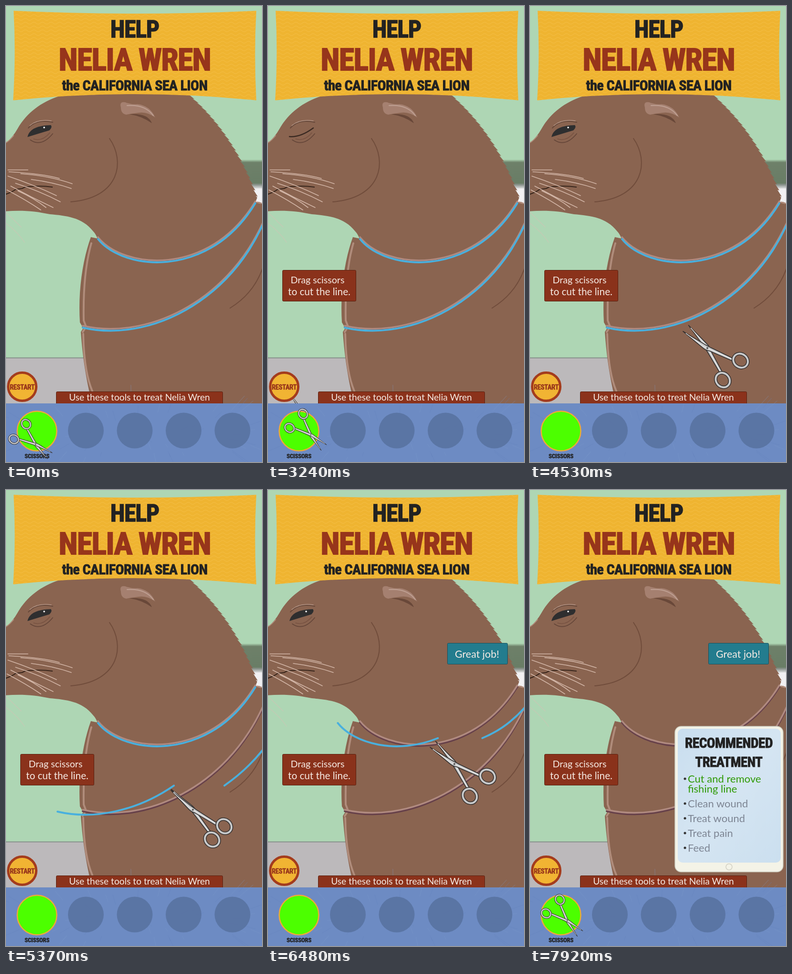
Write an HTML page that moves like this. It is 537x957 px and loops after 8 s.

```html
<!DOCTYPE html>
<html lang="en">
<head>
<meta charset="utf-8">
<title>Sea lion care game</title>
<style>
html, body { margin: 0; width: 100%; height: 100%; overflow: hidden; background: #aed6b4; }
svg { display: block; width: 100%; height: 100%; }
text { text-anchor: middle; font-family: Lato, "Open Sans", sans-serif; fill: #f6ebe4; }
.show { font-family: "Roboto Condensed", "Open Sans Condensed", Roboto, "Open Sans", sans-serif;
  font-weight: 900; font-stretch: condensed; letter-spacing: -.02em; fill: #222; stroke: #222; stroke-linejoin: miter; }
.red { fill: #97351b; stroke: #97351b; }
.list text { text-anchor: start; font-size: 22px; fill: #7d8593; }
.line { fill: none; stroke: #49b0de; stroke-width: 4; stroke-linecap: round; }
.thin { fill: none; stroke-linecap: round; }
</style>
</head>
<body>
<svg viewBox="0 0 537 957" preserveAspectRatio="none">
<defs>
  <linearGradient id="wall" x2="0" y2="1">
    <stop offset="0" stop-color="#aed6b4"/><stop offset=".1" stop-color="#6e8069"/>
    <stop offset=".8" stop-color="#697d66"/><stop offset=".86" stop-color="#8b938d"/><stop offset="1" stop-color="#e9e9ea"/>
  </linearGradient>
  <linearGradient id="screen" x2="1" y2="1">
    <stop offset="0" stop-color="#c9deef"/><stop offset=".5" stop-color="#d5e5f2"/><stop offset="1" stop-color="#cbdfef"/>
  </linearGradient>
  <pattern id="waves" width="18" height="8" patternUnits="userSpaceOnUse">
    <path d="M0 4Q4.500 0 9 4T18 4" fill="none" stroke="#f8cb5c" stroke-width="1" opacity=".45"/>
  </pattern>
  <path id="cutLow" d="M161 675C290 705 460 630 538 460"/>
  <path id="cutTop" d="M193 489C245 555 425 575 523 414"/>
  <g id="half">
    <path d="M-62-1L-9-5Q0-6 8-2L60 9L58 14L6 5L-10 3Z" fill="#c6c7c8" stroke="#34302f" stroke-width="1.600" stroke-linejoin="round"/>
    <path d="M-55-1L-8-2L54 11" fill="none" stroke="#eee" stroke-width="1.300"/>
    <ellipse cx="72" cy="19" rx="16" ry="14" fill="none" stroke="#34302f" stroke-width="7"/>
    <ellipse cx="72" cy="19" rx="16" ry="14" fill="none" stroke="#c9cacb" stroke-width="4"/>
  </g>
</defs>

<rect width="537" height="957" fill="#aed6b4"/>
<rect x="440" y="322" width="97" height="62" fill="url(#wall)"/>
<rect x="440" y="383" width="97" height="60" fill="#f1f0f2"/>
<rect y="739" width="200" height="100" fill="#bcb9bb"/>
<path d="M0 738.500H170" stroke="#87918b" stroke-width="2"/>

<path id="seal" fill="#8a6450"/>
<g class="thin" stroke="#b08c7b">
  <path d="M0 287Q8 282 16 272" stroke-width="2"/>
  <path d="M179 498C164 550 162 610 163 660L168 673L161 684" stroke-width="4"/>
  <path d="M162 688C163 740 169 780 181 808" stroke-width="4"/>
  <path d="M527 412L535 414" stroke-width="3"/>
</g>
<g class="thin" stroke="#704c3b" stroke-width="2">
  <path d="M217 278C250 325 240 402 136 411"/>
  <path d="M470 634Q522 602 540 545"/>
</g>
<path d="M258 227Q298 224 306 246Q285 231 258 227Z" fill="#694839"/>
<path d="M241 213Q237 200 250 202Q262 207 276 206Q302 209 313 234Q296 221 278 224Q262 226 252 228Q241 226 241 213Z" fill="#a58070"/>
<path class="thin" d="M254 209Q292 206 309 230" stroke="#bfa093" stroke-width="2"/>

<path class="thin" d="M47 256Q64 237 98 244" stroke="#66483a" stroke-width="2"/>
<path class="thin" d="M50 251Q66 237 95 241" stroke="#b39384" stroke-width="1.500"/>
<path class="thin" d="M51 281Q74 297 98 268" stroke="#644538" stroke-width="1.700"/>
<path class="thin" d="M58 279Q76 285 92 266" stroke="#765141" stroke-width="1.500"/>
<g id="open">
  <path d="M45 275Q50 251 94 250Q98 254 91 261Q74 266 45 275Z" fill="#2e2e2f"/>
  <circle cx="80" cy="255" r="1.800" fill="#fff"/>
</g>
<path id="shut" class="thin" d="M45 274Q68 276 95 256" stroke="#3b2a22" stroke-width="2.500"/>

<path class="thin" d="M0 395Q14 390 20 385L34 383L40 380Q70 376 97 380" stroke="#38261c" stroke-width="2.200"/>
<path class="thin" stroke="#d2b5a6" stroke-width="1.600" d="M4 344H46M6 348Q78 352 112 362M31 352Q90 356 139 373M53 364Q100 370 137 383M4 357Q60 376 106 398M20 372Q70 388 114 411M10 378Q54 402 99 423M25 388Q60 404 84 423M2 386Q42 407 73 428"/>
<path class="thin" stroke="#c5c9b5" stroke-width="1.300" d="M0 433L32 464M0 456Q24 474 39 496"/>

<g class="thin">
  <use href="#cutTop" y="-1" stroke="#67414a" stroke-width="4"/><use href="#cutTop" y="-4" stroke="#b08a80" stroke-width="3.500"/>
  <use href="#cutLow" y="-1" stroke="#67414a" stroke-width="4"/><use href="#cutLow" y="-4" stroke="#b08a80" stroke-width="3.500"/>
</g>
<g id="lines"></g>
<g id="big"><use class="a" href="#half"/><use class="b" href="#half"/><circle r="2" fill="#555"/></g>

<path d="M16 10Q270 22 525 10Q520 100 525 198Q270 172 15 198Q21 100 16 10Z" fill="#efb431"/>
<path d="M16 10Q270 22 525 10Q520 100 525 198Q270 172 15 198Q21 100 16 10Z" fill="url(#waves)"/>
<g id="title"></g>

<g id="hint"><rect x="30.500" y="554.500" width="154" height="65" rx="2" fill="#8a321b" stroke="#59200f"/></g>
<g id="praise"><rect x="374.500" y="321.500" width="126" height="44" rx="2" fill="#237c8e" stroke="#17505c"/></g>

<circle cx="34" cy="799" r="29.500" fill="#f1b433" stroke="#a43c1d" stroke-width="5"/>
<g id="restart"></g>

<rect y="834" width="537" height="123" fill="#6d8bc3"/>
<g id="tray"></g>
<circle cx="65" cy="892" r="41.500" fill="#4cff00" stroke="#f2a73a" stroke-width="2.500"/>
<g id="label"></g>
<g id="small"><use class="a" href="#half"/><use class="b" href="#half"/><circle r="2" fill="#555"/></g>
<g id="bar"><path d="M105.500 834V811.500Q105.500 809.500 107.500 809.500H452.500Q454.500 809.500 454.500 811.500V834" fill="#8b321b" stroke="#59200f"/></g>

<g id="tablet">
  <rect x="304" y="496" width="227" height="305.500" rx="13" fill="#f4f3e7" stroke="#c9c8ba" stroke-width="1.500"/>
  <rect x="310" y="501" width="216" height="281" rx="10" fill="url(#screen)"/>
  <circle cx="417.500" cy="791" r="6.500" fill="none" stroke="#d3d1c4" stroke-width="1.500"/>
  <g class="list">
    <g id="done"><text x="331" y="614">Cut and remove</text><text x="331" y="635">fishing line</text></g>
    <text x="331" y="666">Clean wound</text><text x="331" y="697">Treat wound</text>
    <text x="331" y="728">Treat pain</text><text x="331" y="759">Feed</text>
  </g>
  <path d="M325 606h.1M325 658h.1M325 689h.1M325 720h.1M325 751h.1" class="thin" stroke="#333" stroke-width="5"/>
</g>
</svg>

<script>
const $ = id => document.getElementById(id);
const hero = ["Nelia", "Wren"].join(" ");

function add(parent, tag, attrs) {
  const el = document.createElementNS("http://www.w3.org/2000/svg", tag);
  for (const k in attrs) el.setAttribute(k, attrs[k]);
  return parent.appendChild(el);
}

// Text centred on (x, mid), as large as the width and size limits allow
function label(id, str, x, mid, width, max, cls = "") {
  const el = add($(id), "text", { x, class: cls });
  el.textContent = str;
  el.style.fontSize = "100px";
  const size = Math.min(max, 100 * width / el.getComputedTextLength());
  el.style.fontSize = size + "px";
  el.style.strokeWidth = cls ? size * .03 : 0;
  el.setAttribute("y", mid + size * .36);
}
label("title", "HELP", 270, 48.5, 102, 70, "show");
label("title", hero.toUpperCase(), 270, 112, 319, 88, "show red");
label("title", "the CALIFORNIA SEA LION", 270, 166, 305, 40, "show");
label("restart", "RESTART", 34, 800, 52, 20, "show red");
label("label", "SCISSORS", 65, 944, 52, 17, "show");
label("hint", "Drag scissors", 104, 575, 113, 23);
label("hint", "to cut the line.", 107.5, 600, 131, 23);
label("praise", "Great job!", 436.5, 344, 93, 23);
label("bar", "Use these tools to treat " + hero, 280, 821, 296, 22);
label("tablet", "RECOMMENDED", 417, 530, 184, 39, "show");
label("tablet", "TREATMENT", 417, 571, 141, 39, "show");

// Seal outline with tufts of fur down the back of the neck
let fur = "";
for (let i = 1; i <= 20; i++) {
  const u = i / 20, v = 1 - u;
  const x = 385 * v * v + 960 * u * v + 527 * u * u, y = 187 * v * v + 540 * u * v + 400 * u * u;
  fur += `L${x + 1} ${y}L${x - 3} ${y - 1}`;
}
$("seal").setAttribute("d", `M-2 289Q14 276 24 258C42 226 72 202 112 189L250 150L385 187${fur}
  L527 402L523 412L531 411L540 417V840H182C172 800 162 755 157 684L162 676L155 664C151 600 160 535 178 485L192 488
  Q188 478 183 473C160 443 125 440 92 437C60 430 30 428-2 431Z`);

// Tray texture and empty slots
let seed = 7;
const rnd = () => (seed = seed * 16807 % 2147483647) / 2147483647;
for (let i = 0; i < 60; i++) {
  const x = rnd() * 537, y = 838 + rnd() * 110, l = 10 + rnd() * 35;
  add($("tray"), "path", { d: `M${x} ${y}l${(x - 268) / 268 * l} ${(y - 900) / 60 * l}`,
    stroke: i % 2 ? "#7d9bcb" : "#6280bb", opacity: .4 });
}
for (let i = 0; i < 4; i++)
  add($("tray"), "circle", { cx: 167.5 + 102.5 * i, cy: 891, r: 37.5, fill: "#57719f", opacity: .85 });

// Each fishing line is two strokes that part at the cut
const strands = [["#cutTop", 58, 6330], ["#cutLow", 55, 5210]].map(([ref, p, at]) => {
  const d = document.querySelector(ref).getAttribute("d");
  const piece = (dash, off) => add($("lines"), "path",
    { d, class: "line", pathLength: 100, "stroke-dasharray": dash, "stroke-dashoffset": off });
  return { at, left: piece(`${p} 200`, 0), right: piece(`${100 - p} 200`, -p) };
});

// Rows of [time, values...], linear in between
function keys(rows, t) {
  const i = rows.findIndex(r => r[0] > t);
  if (i < 0) return rows[rows.length - 1].slice(1);
  if (!i) return rows[0].slice(1);
  const a = rows[i - 1], b = rows[i], u = (t - a[0]) / (b[0] - a[0]);
  return a.slice(1).map((v, k) => v + (b[k + 1] - v) * u);
}
const part = (t, from, to) => Math.max(0, Math.min(1, (t - from) / (to - from)));
const back = u => 1 + 3.5 * (u - 1) ** 3 + 2.5 * (u - 1) ** 2;
const move = (id, x) => $(id).setAttribute("transform", `translate(${x})`);
const show = (el, on) => el.setAttribute("opacity", +on);

// x, y and opening angle of the cutting scissors
const bigPath = [[3090, 60, 900, 14], [3780, 164, 766, 14], [4530, 372, 718, 7], [4680, 378, 708, 10],
  [4950, 386, 688, 13], [5210, 392, 671, 0], [5500, 392, 671, 0], [5850, 392, 625, 12], [6180, 391, 580, 12],
  [6330, 391, 575, 1], [6480, 391, 575, 7], [6630, 391, 575, 7], [7110, 60, 900, 7]];
// x, y, rotation and opacity of the tray scissors
const smallPath = [[0, 62, 920, 219, 1], [120, 73, 909, 223, 1], [330, 78, 904, 225, 1], [3090, 78, 904, 225, 1],
  [3400, 102, 896, 223, 1], [3600, 151, 879, 221, 1], [3780, 219, 856, 218, 1], [3870, 264, 841, 218, 1],
  [3990, 320, 825, 218, 0], [6840, 264, 841, 218, 0], [6930, 225, 854, 220, 1], [7110, 108, 886, 224, 1],
  [7139, 108, 886, 224, 1], [7140, 78, 904, 225, 1]];
const blinks = [[1200, 1440], [1770, 1980], [3150, 3390], [4890, 5100]];

function scissors(id, x, y, turn, scale, gap) {
  const g = $(id);
  g.setAttribute("transform", `translate(${x} ${y}) rotate(${turn}) scale(${scale})`);
  g.querySelector(".a").setAttribute("transform", `rotate(${gap})`);
  g.querySelector(".b").setAttribute("transform", `scale(1 -1) rotate(${gap})`);
}

function draw(t) {
  const shut = blinks.some(([a, b]) => t >= a && t < b);
  show($("open"), !shut);
  show($("shut"), shut);

  move("hint", -190 * (1 - back(part(t, 0, 360))));
  move("praise", 165 * (1 - part(t, 6180, 6570)) ** 3);
  move("tablet", 240 * (1 - back(part(t, 7260, 7480))));
  for (const el of $("done").children) el.style.fill = t >= 7920 ? "#2f9a06" : "";

  for (const s of strands) {
    const dt = Math.max(0, t - s.at), dx = 46 * (dt / 150) ** 2;
    s.left.setAttribute("transform", `translate(${-dx})`);
    s.right.setAttribute("transform", `translate(${dx})`);
    for (const el of [s.left, s.right]) el.setAttribute("opacity", 1 - part(dt, 200, 280));
  }

  const [bx, by, gap] = keys(bigPath, t);
  scissors("big", bx, by, 42.5, 1, gap);
  show($("big"), t >= 3090 && t < 7110);
  const [sx, sy, turn, alpha] = keys(smallPath, t);
  scissors("small", sx, sy, turn, .63, 11);
  $("small").setAttribute("opacity", alpha);
}

const start = performance.now();
function tick() {
  draw((performance.now() - start) % 8000);
  requestAnimationFrame(tick);
}
tick();
</script>
</body>
</html>
```
